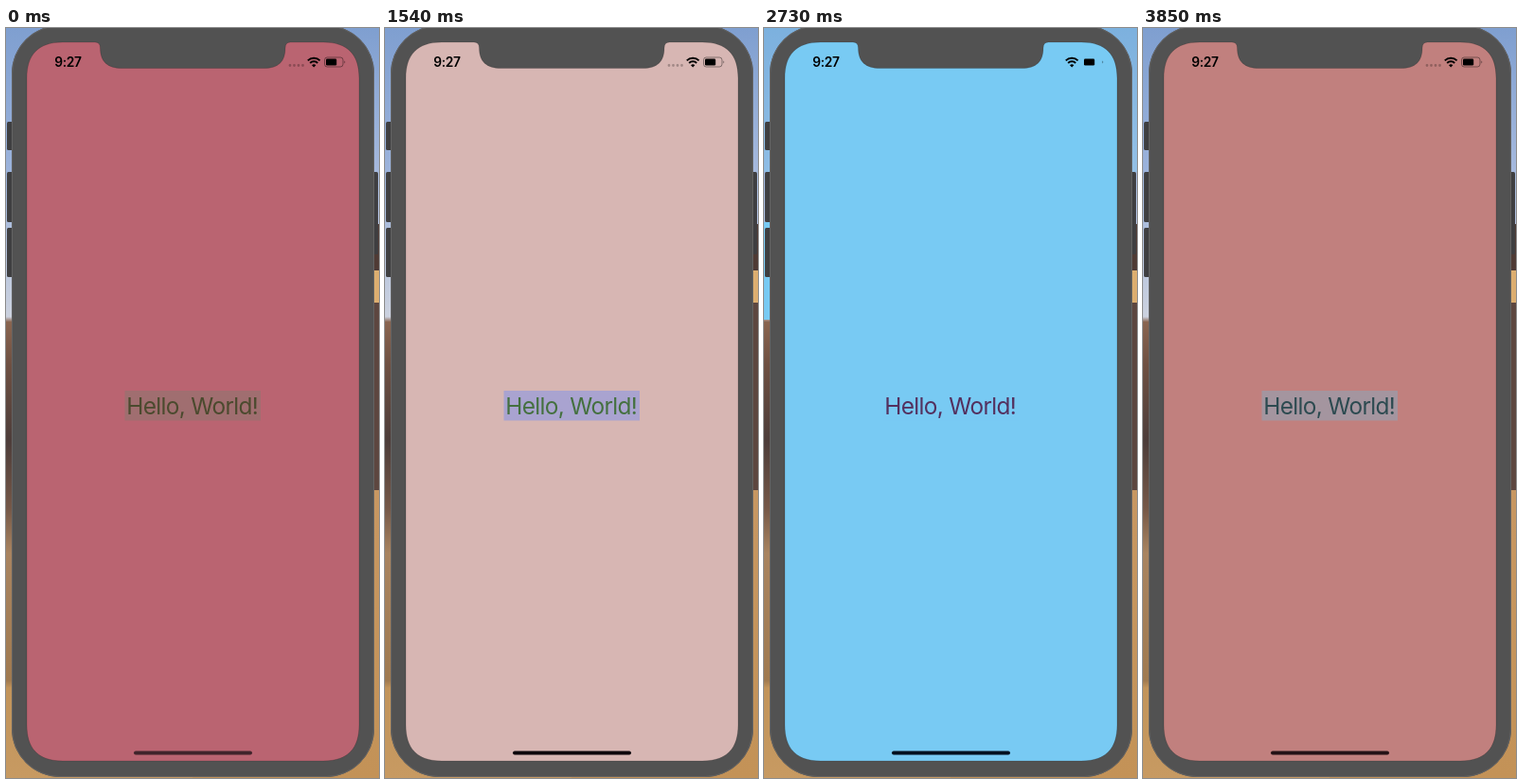
An HTML page for the animation above (3.92 s loop, 394x792 px).

```html
<!DOCTYPE html>
<html lang="en">
<head>
<meta charset="utf-8">
<title>Hello</title>
<style>
  html, body { margin: 0; width: 100%; height: 100%; overflow: hidden; }
  svg { display: block; width: 394px; height: 792px; }
  text { font-family: Inter, Roboto, sans-serif; }
  #hello { font-size: 24.4px; letter-spacing: -.65px; text-anchor: middle; }
  #clock { font-size: 13.8px; font-weight: 600; letter-spacing: -.35px; }
</style>
</head>
<body>
<svg viewBox="0 0 394 792">
  <defs>
    <linearGradient id="left" x2="0" y2="1">
      <stop offset="0" stop-color="#7f9fd0"/>
      <stop offset=".2" stop-color="#9db4dc"/>
      <stop offset=".385" stop-color="#ccd2df"/>
      <stop offset=".392" stop-color="#8a6550"/>
      <stop offset=".45" stop-color="#6e5042"/>
      <stop offset=".55" stop-color="#4d3d3a"/>
      <stop offset=".64" stop-color="#755848"/>
      <stop offset=".7" stop-color="#a98460"/>
      <stop offset=".87" stop-color="#a07a50"/>
      <stop offset=".88" stop-color="#c2945a"/>
      <stop offset="1" stop-color="#c79a62"/>
    </linearGradient>
    <linearGradient id="sky" x2="0" y2="1">
      <stop offset="0" stop-color="#7f9fd0"/>
      <stop offset="1" stop-color="#b4c3e2"/>
    </linearGradient>
    <linearGradient id="sand" x2="0" y2="1">
      <stop offset="0" stop-color="#c79762"/>
      <stop offset="1" stop-color="#c39257"/>
    </linearGradient>
  </defs>

  <!-- desktop behind the phone -->
  <rect width="197" height="792" fill="url(#left)"/>
  <rect x="197" width="197" height="207" fill="url(#sky)"/>
  <rect x="197" y="207" width="197" height="49" fill="#4f3b35"/>
  <rect x="197" y="256" width="197" height="35" fill="#dcae70"/>
  <rect x="197" y="290" width="197" height="198" fill="#5d4740"/>
  <rect x="197" y="488" width="197" height="304" fill="url(#sand)"/>
  <g id="tint" fill="#78caf3">
    <path d="M0 0H394V152H0z" opacity=".4"/>
    <path d="M0 205H8V308H0z"/>
  </g>

  <!-- phone -->
  <g fill="#3f3f41">
    <rect x="1" y="99" width="8" height="30" rx="1.5"/>
    <rect x="1" y="152" width="8" height="53" rx="1.5"/>
    <rect x="1" y="211" width="8" height="52" rx="1.5"/>
    <rect x="386" y="152" width="7" height="87" rx="1.5"/>
  </g>
  <rect x="6" y="-3" width="383" height="794" rx="51" fill="#525252"/>
  <rect x="6.5" y="-2.5" width="382" height="793" rx="50.5" fill="none" stroke="#636363"/>
  <path id="screen" stroke="#000" stroke-opacity=".2" stroke-width=".8" d="M60 15H94Q99.500 15 99.500 21C99.500 36 108 42.500 122 42.500H273C287 42.500 295 36 295 21Q295 15 300.500 15H335C361 15 373 28 373 53V736C373 761 361 774 335 774H60C34 774 22 761 22 736V53C22 28 34 15 60 15z"/>

  <!-- status bar -->
  <text id="clock" x="51.3" y="41">9:27</text>
  <g id="faint">
    <path d="M300 39.500h.01M304.500 39.500h.01M309 39.500h.01M313.500 39.500h.01" stroke="#000" stroke-opacity=".25" stroke-width="2.8" stroke-linecap="round"/>
    <rect x="336.500" y="31" width="19.500" height="10" rx="2.800" fill="none" stroke="#000" stroke-opacity=".4"/>
  </g>
  <path d="M357.300 34.500Q359.300 36 357.300 37.500z" fill-opacity=".45"/>
  <rect x="338" y="32.500" width="11.200" height="7" rx="1.300"/>
  <g fill="none" stroke="#000" stroke-width="1.900">
    <path d="M318.800 34.400A9 9 0 0 1 331.600 34.400"/>
    <path d="M321.200 37A5.600 5.600 0 0 1 329.200 37"/>
  </g>
  <path d="M325.200 41.500L323 39.200A3.200 3.200 0 0 1 327.400 39.200z"/>

  <rect id="label" x="125.500" y="383" width="143.500" height="31.500"/>
  <text id="hello" x="196.700" y="408.300">Hello, World!</text>
  <rect id="bar" x="135" y="763.500" width="125" height="4" rx="2"/>
</svg>
<script>
const LOOP = 3920, FIRST = 630, HOLD = 1050;

// screen, label, text, home bar
const themes = [
  ['#ba6471', '#a06e70', '#4b4a2e', '#40242b'],
  ['#d7b6b3', '#a9a3d0', '#44703f', '#0d070b'],
  ['#a3e4d8', '#b3dfbf', '#6d6832', '#040808'],
  ['#78caf3', '#78caf3', '#53305e', '#04101f'],
  ['#c1807e', '#a4959f', '#2c4a50', '#241216']
];
const BLUE = 3;
const parts = ['screen', 'label', 'hello', 'bar'].map(id => document.getElementById(id));
const tint = document.getElementById('tint');
const faint = document.getElementById('faint');
const start = performance.now();

function draw() {
  const t = (performance.now() - start) % LOOP;
  const i = t < FIRST ? 0 : 1 + Math.floor((t - FIRST) / HOLD);
  parts.forEach((el, k) => el.setAttribute('fill', themes[i][k]));
  tint.style.display = i === BLUE ? '' : 'none';
  faint.style.display = i === BLUE ? 'none' : '';
  requestAnimationFrame(draw);
}
draw();
</script>
</body>
</html>
```
